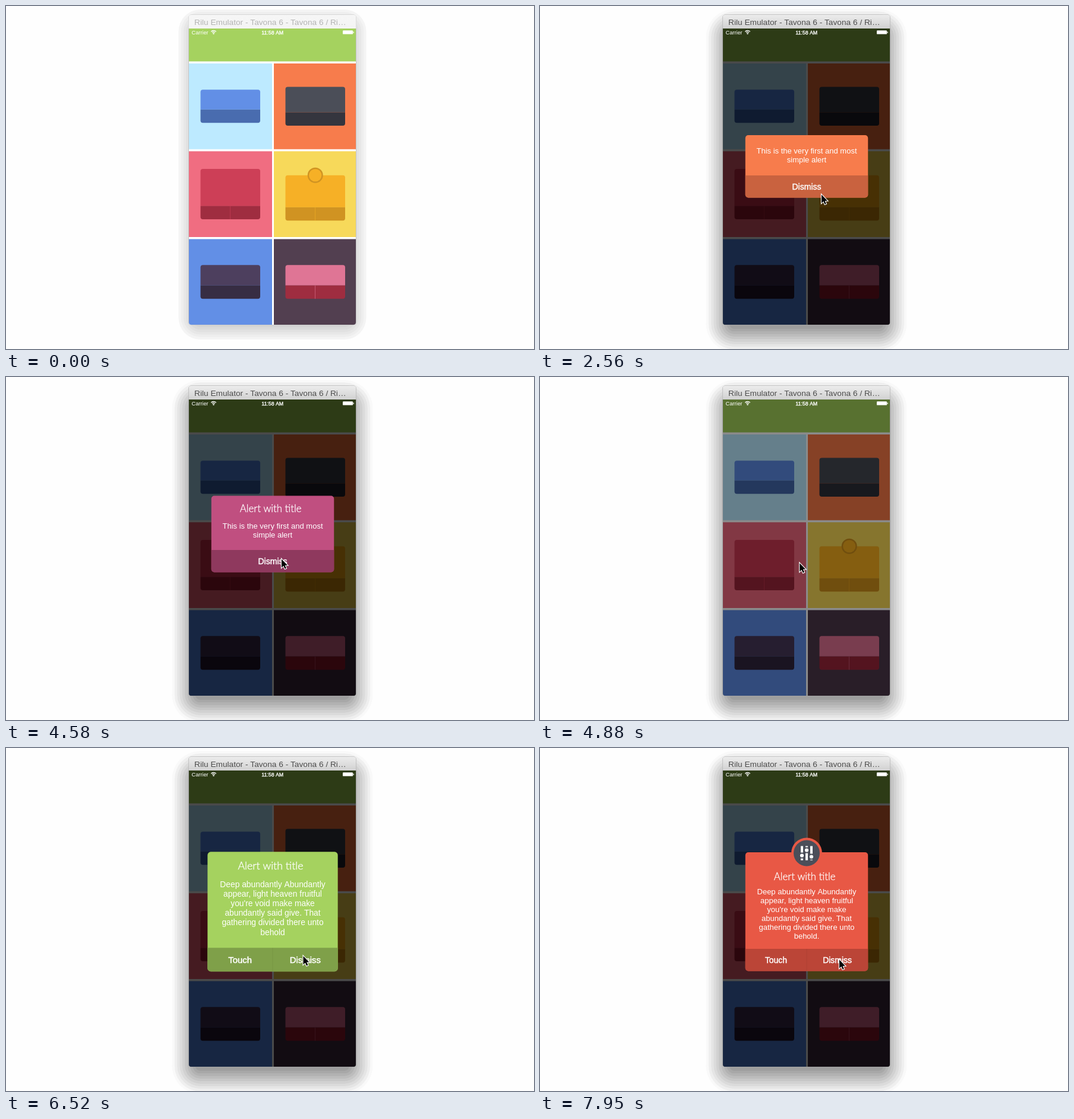
Write an HTML page with a canvas that moves like this. It is 889 px wide and 579 px high and loops after 8000 ms.

```html
<!DOCTYPE html>
<html lang="en">
<head>
<meta charset="utf-8">
<title>Alert styles</title>
<style>
html, body { margin: 0; width: 100%; height: 100%; overflow: hidden; background: #fefefe; }
canvas { display: block; }
</style>
</head>
<body>
<canvas id="stage" width="889" height="579"></canvas>
<script>
const ctx = document.getElementById('stage').getContext('2d');
const LOOP = 8000, ENTER = 600, ACTIVATE = 800;
const SANS = '"Liberation Sans", Arial, sans-serif';
const phone = { left: 307.5, top: 15, right: 589.5, bottom: 538 };

const SHORT = ['This is the very first and most', 'simple alert'];
const LONG = ['Deep abundantly Abundantly', 'appear, light heaven fruitful', "you're void make make",
  'abundantly said give. That', 'gathering divided there unto'];

// The pointer taps a tile, the alert opens, the pointer leaves for the button, the alert closes.
// titleY and textY are baselines below the top of the alert.
const alerts = [
  { open: 1000, leave: 1430, close: 2560, tap: [389, 168], button: [473, 317],
    color: '#f77c4c', bar: '#c9623f', cy: 270.75, h: 105.5, textY: 31, lines: SHORT },
  { open: 3450, leave: 3740, close: 4580, tap: [522, 170], button: [463, 306],
    color: '#c04f80', bar: '#8f395e', cy: 265, h: 129, titleY: 28, textY: 55.5, lines: SHORT },
  { open: 5400, leave: 5690, close: 6410, tap: [407, 320], button: [498, 352], touch: true,
    color: '#a5d25f', bar: '#7fa049', cy: 276.25, h: 190, titleY: 28, textY: 56, lines: [...LONG, 'behold'] },
  { open: 7230, leave: 7230, close: LOOP, tap: [516, 325], button: [503, 356], touch: true, icon: true,
    color: '#e85845', bar: '#bb4537', cy: 276.25, h: 200.5, titleY: 46.5, textY: 70.5, lines: [...LONG, 'behold.'] },
];

const tiles = [
  { bg: '#bdeaff', face: '#628fe6', base: '#496caf', h: 56 },
  { bg: '#f77c4c', face: '#4b4e58', base: '#34353e', h: 65.5 },
  { bg: '#f06d81', face: '#cd3f57', base: '#9f2d40', h: 85, divided: true },
  { bg: '#f7d95a', face: '#f6b026', base: '#d09322', h: 89.5, divided: true, knob: true },
  { bg: '#628fe6', face: '#4d3f5e', base: '#372d43', h: 57 },
  { bg: '#523f50', face: '#df7595', base: '#9f2d40', h: 57, divided: true },
];

const clamp = v => Math.min(1, Math.max(0, v));
const lerp = (a, b, u) => a + (b - a) * u;
const ease = u => u * u * (3 - 2 * u);

// Colour under the dark backdrop, which deepens dark tones most
function dimmed(hex, dim) {
  const rgb = [1, 3, 5].map(i => parseInt(hex.slice(i, i + 2), 16));
  return `rgb(${rgb.map(v => Math.round(lerp(v, Math.max(0, v * .32 - 8), dim)))})`;
}

function rect(x, y, w, h, fill) {
  ctx.fillStyle = fill;
  ctx.fillRect(x, y, w, h);
}

function round(x, y, w, h, r, fill) {
  ctx.beginPath();
  ctx.roundRect(x, y, w, h, r);
  ctx.fillStyle = fill;
  ctx.fill();
}

function disc(x, y, r, fill) {
  ctx.beginPath();
  ctx.arc(x, y, r, 0, Math.PI * 2);
  ctx.fillStyle = fill;
  ctx.fill();
}

function text(str, x, y, font, fill, align = 'center', weight = 0) {
  ctx.font = font;
  ctx.textAlign = align;
  ctx.fillStyle = ctx.strokeStyle = fill;
  ctx.fillText(str, x, y);
  if (weight) {
    ctx.lineWidth = weight;
    ctx.strokeText(str, x, y);
  }
}

// Banded shadow around the phone, from a wide light band to a narrow dark one
function drawShadow(grow, inset, drop, light, dark) {
  const bands = Math.round((grow + inset) / 4.3);
  for (let i = 0; i <= bands; i++) {
    const s = lerp(grow, -inset, i / bands), v = Math.round(lerp(light, dark, i / bands));
    round(phone.left - s, phone.top - s + drop, phone.right - phone.left + 2 * s,
      phone.bottom - phone.top + 2 * s, 20 + s, `rgb(${v},${v},${v})`);
  }
}

function drawWindow(active) {
  if (active) drawShadow(28, 11, 18, 249, 158);
  else drawShadow(17, 4, 8, 244, 212);
  round(307, 14.5, 283, 524, 5, active ? '#a5a5a5' : '#c4c4c4');
  const bar = ctx.createLinearGradient(0, 15, 0, 38);
  bar.addColorStop(0, active ? '#ececec' : '#f6f6f6');
  bar.addColorStop(1, active ? '#d1d1d1' : '#f4f4f4');
  round(307.5, 15, 282, 23, [4, 4, 0, 0], bar);
  text('Rilu Emulator - Tavona 6 - Tavona 6 / Ri…', 317, 32, `13.7px ${SANS}`,
    active ? '#4c4c4c' : '#b3b3b3', 'left');
}

function drawTile(tile, i, dim) {
  const x = 308 + 143 * (i % 2), y = 97 + 148.25 * Math.floor(i / 2);
  const left = x + 19.5, w = 100.5, baseH = 22.5, knobR = tile.knob ? 13 : 0;
  const top = y + 72.25 - tile.h / 2 + knobR, split = y + 72.25 + tile.h / 2 - baseH;
  const face = dimmed(tile.face, dim), base = dimmed(tile.base, dim);
  rect(x, y, 140, 144.75, dimmed(tile.bg, dim));
  round(left, top, w, split - top, [4, 4, 0, 0], face);
  round(left, split, w, baseH, [0, 0, 4, 4], base);
  if (tile.divided) {
    ctx.globalAlpha = .6;
    rect(left + w / 2 - .75, split, 1, baseH, face);
    ctx.globalAlpha = 1;
  }
  if (tile.knob) {
    disc(left + w / 2, top, knobR, base);
    disc(left + w / 2, top, knobR - 2.4, face);
  }
}

function drawStatusBar() {
  text('Carrier', 312.5, 48, `9.2px ${SANS}`, '#fff', 'left');
  text('11:58 AM', 448.7, 48, `8.8px ${SANS}`, '#fff', 'center', .35);
  ctx.lineWidth = 1.3;
  for (const r of [3.2, 5.8]) {
    ctx.beginPath();
    ctx.arc(349.5, 47.3, r, -Math.PI * .76, -Math.PI * .24);
    ctx.stroke();
  }
  disc(349.5, 46.6, 1.2, '#fff');
  round(567, 41.2, 17, 6.4, 1.2, '#fff');
  round(584.6, 43, 1.2, 3, .6, '#fff');
}

function drawScreen(dim) {
  ctx.save();
  ctx.beginPath();
  ctx.roundRect(308, 38, 281, 500, [0, 0, 4, 4]);
  ctx.clip();
  rect(308, 38, 281, 500, dimmed('#ffffff', dim));
  rect(308, 38, 281, 55.5, dimmed('#a5d25f', dim));
  tiles.forEach((tile, i) => drawTile(tile, i, dim));
  ctx.restore();
  drawStatusBar();
}

function drawSliders(y) {
  [4, -5, 6].forEach((knob, i) => {
    const x = (i - 1) * 8;
    rect(x - 2, y - 12, 4, 24, '#fff');
    rect(x - 3, y + knob - 5, 6, 10, '#4b4e59');
    disc(x, y + knob, 3.1, '#fff');
  });
}

function drawAlert(a, scale) {
  if (scale <= .01) return;
  const w = 206.5, left = -w / 2, top = -a.h / 2, barH = 37.5, barY = a.h / 2 - barH;
  const label = (str, x) => text(str, x, barY + 24, `14px ${SANS}`, '#fff', 'center', .45);
  ctx.save();
  ctx.translate(449, a.cy);
  ctx.scale(scale, scale);
  if (a.icon) disc(0, top + 1.5, 26, a.color);
  round(left, top, w, a.h, 5, a.color);
  round(left, barY, w, barH, [0, 0, 5, 5], a.bar);
  if (a.icon) {
    disc(0, top + 1.5, 22, '#4b4e59');
    drawSliders(top + 1.5);
  }
  if (a.titleY) text('Alert with title', -3.3, top + a.titleY, '300 16.8px Lato, sans-serif', '#fff', 'center', .35);
  a.lines.forEach((line, i) => text(line, 0, top + a.textY + i * 15.2, `13px ${SANS}`, '#fff'));
  if (a.touch) {
    rect(-.5, barY, 1, barH, 'rgba(0,0,0,.06)');
    label('Touch', -w / 4);
    label('Dismiss', w / 4);
  } else label('Dismiss', 0);
  ctx.restore();
}

// Springs in shortly after the backdrop, then shrinks before the backdrop clears
function alertState(a, t) {
  if (t < a.close) {
    const s = Math.max(0, t - a.open - 60) / 1000;
    return { dim: clamp((t - a.open) / 110), scale: 1 - Math.exp(-14.7 * s) * Math.cos(18.4 * s) };
  }
  const since = t - a.close, u = clamp(since / 200);
  return { dim: 1 - clamp((since - 190) / 310), scale: 1 - u * u * (2.7 * u - 1.7) };
}

function pointerAt(t) {
  let pos = [405, 582], free = ENTER;
  const glide = (to, from, until) => {
    const u = ease(clamp((t - from) / (until - from)));
    pos = pos.map((v, i) => lerp(v, to[i], u));
  };
  for (const a of alerts) {
    glide(a.tap, free, a.open - 200);
    glide(a.button, a.leave, a.leave + 480);
    free = a.close;
  }
  return pos;
}

function drawPointer([x, y]) {
  ctx.save();
  ctx.translate(x + 1, y + 1.5);
  ctx.beginPath();
  [[0, 0], [0, 14.2], [3.3, 11.2], [5.6, 16.3], [7.8, 15.4], [5.6, 10.4], [9.9, 10.2]]
    .forEach(p => ctx.lineTo(...p));
  ctx.closePath();
  ctx.strokeStyle = '#fff';
  ctx.lineWidth = 2.2;
  ctx.stroke();
  ctx.fillStyle = '#000';
  ctx.fill();
  ctx.restore();
}

function draw(t) {
  const current = alerts.filter(a => t >= a.open).pop();
  const { dim, scale } = current ? alertState(current, t) : { dim: 0, scale: 0 };
  rect(0, 0, 889, 579, '#fefefe');
  drawWindow(t >= ACTIVATE);
  drawScreen(dim);
  if (current) drawAlert(current, scale);
  drawPointer(pointerAt(t));
}

const start = performance.now();
function tick() {
  draw((performance.now() - start) % LOOP);
  requestAnimationFrame(tick);
}
tick();
</script>
</body>
</html>
```
